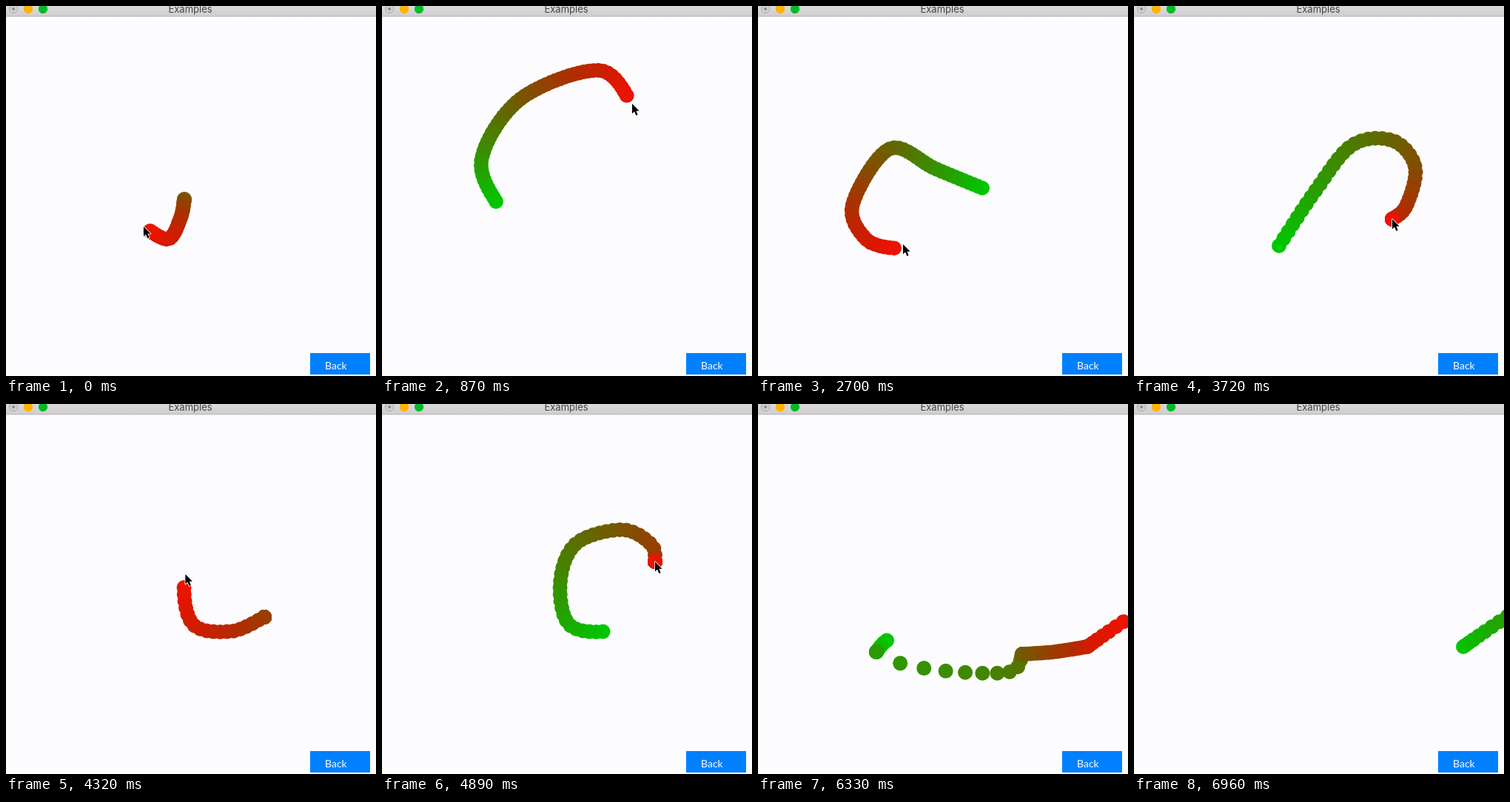
Animation, 500 px wide and 500 px high, one loop 6990 ms. Source, as an HTML page:

```html
<!DOCTYPE html>
<html lang="en">
<head>
<meta charset="utf-8">
<title>Pointer trail</title>
<style>
  html, body { margin: 0; width: 100%; height: 100%; overflow: hidden; background: #fcfcfe; }
  svg { display: block; width: 100%; height: 100%; }
  .title { font: 13px Inter, "Open Sans", sans-serif; fill: #444; text-anchor: middle; }
  .label { font: 14px Lato, "Open Sans", sans-serif; fill: #fff; }
</style>
</head>
<body>
<svg viewBox="0 0 500 500">
  <defs>
    <linearGradient id="bar" x2="0" y2="1">
      <stop offset="0" stop-color="#dcd9dc"/>
      <stop offset="1" stop-color="#d0cdd0"/>
    </linearGradient>
  </defs>
  <rect width="500" height="500" fill="#fcfcfe"/>
  <rect width="500" height="14" fill="url(#bar)"/>
  <rect y="13.5" width="500" height="1" fill="#b8b5b6"/>
  <circle cx="10" cy="4" r="5.7" fill="#d2cfd0" stroke="#aaa8a8"/>
  <circle cx="10" cy="4" r="2" fill="#8c8a8a"/>
  <circle cx="30" cy="4" r="6.2" fill="#ffb400"/>
  <circle cx="50" cy="4" r="6.2" fill="#00bc28"/>
  <text class="title" x="249" y="9">Examples</text>
  <rect x="411" y="469" width="81" height="29" fill="#0080ff"/>
  <text class="label" x="431" y="491">Back</text>
  <g id="trail"></g>
  <path id="pointer" d="M0 0V13.4L3 10.6L5.4 16L7.6 15L5.4 9.8H9.6Z"
        fill="#000" stroke="#fff" stroke-width="1.6" stroke-linejoin="round" paint-order="stroke"/>
</svg>
<script>
const LOOP = 6990, FRAME = 30, TICK = 15;
const DOTS = 50, RADIUS = 10, FIRST = -25, LEAD = 2;
const SVG = "http://www.w3.org/2000/svg";

const linear = u => u;
const easeIn = power => u => u ** power;
const easeOut = power => u => 1 - (1 - u) ** power;

// Hand gestures in ticks; the pointer rests between them
const strokes = [
  stroke(FIRST, 2, easeIn(1.5), "241,261 236,286 219,315 186,298"),
  stroke(2, 60, linear, "186,298 155,266 135,205 188,125 293,87 338,132"),
  stroke(60, 131, linear, "338,132 372,215 303,246"),
  stroke(131, 182, linear, "303,246 240,220 178,193 128,268 145,314 180,327 196,322"),
  stroke(199, 239, easeOut(1.3), "196,324 245,250 295,188 350,182 380,218 368,270 349,288"),
  stroke(271, 310, linear, "349,288 305,307 253,298 241,240 263,188 325,170 364,190 369,213"),
  stroke(346, 377, easeOut(1.2), "369,214 284,278 210,307 175,319 160,335"),
  stroke(382, 393, easeOut(1.9), "160,335 191,350 256,361 340,362 357,338"),
  stroke(396, 413, linear, "357,338 400,335 445,328"),
  stroke(415, 430, easeIn(1.5), "445,328 500,290 600,225")
];

function stroke(start, end, ease, text) {
  const path = document.createElementNS(SVG, "path");
  path.setAttribute("d", smooth(text.split(" ").map(p => p.split(",").map(Number))));
  return { start, end, ease, path, length: path.getTotalLength() };
}

// Catmull-Rom spline through the points, as cubic curves
function smooth(points) {
  const at = i => points[Math.max(0, Math.min(points.length - 1, i))];
  const handle = (i, sign) => at(i).map((v, k) => v + sign * (at(i + 1)[k] - at(i - 1)[k]) / 6);
  return points.slice(1).reduce(
    (d, p, i) => `${d}C${handle(i, 1)} ${handle(i + 1, -1)} ${p}`, `M${points[0]}`);
}

function position(tick) {
  const s = strokes.findLast(item => item.start <= tick);
  const u = Math.min(1, (tick - s.start) / (s.end - s.start));
  return s.path.getPointAtLength(s.length * s.ease(u));
}

function color(age) {
  const f = age / (DOTS - 1);
  return `rgb(${Math.round(235 * (1 - f))},${Math.round(20 + 180 * f ** 1.4)},0)`;
}

const trail = document.getElementById("trail");
const pointer = document.getElementById("pointer");

// Oldest dot first, so the head is painted on top
const dots = Array.from({ length: DOTS }, (_, i) => {
  const node = document.createElementNS(SVG, "circle");
  const age = DOTS - 1 - i;
  node.setAttribute("r", RADIUS);
  node.setAttribute("fill", color(age));
  trail.append(node);
  return { node, age };
});

function draw(ms) {
  const now = Math.floor(ms % LOOP / FRAME) * FRAME / TICK;
  for (const { node, age } of dots) {
    const tick = now - age;
    const born = tick >= FIRST;
    node.style.display = born ? "" : "none";
    if (!born) continue;
    const { x, y } = position(tick);
    node.setAttribute("cx", x);
    node.setAttribute("cy", y);
  }
  const { x, y } = position(now + LEAD);
  pointer.setAttribute("transform", `translate(${x} ${y})`);
}

const start = performance.now();
function loop() {
  draw(performance.now() - start);
  requestAnimationFrame(loop);
}
loop();
</script>
</body>
</html>
```
